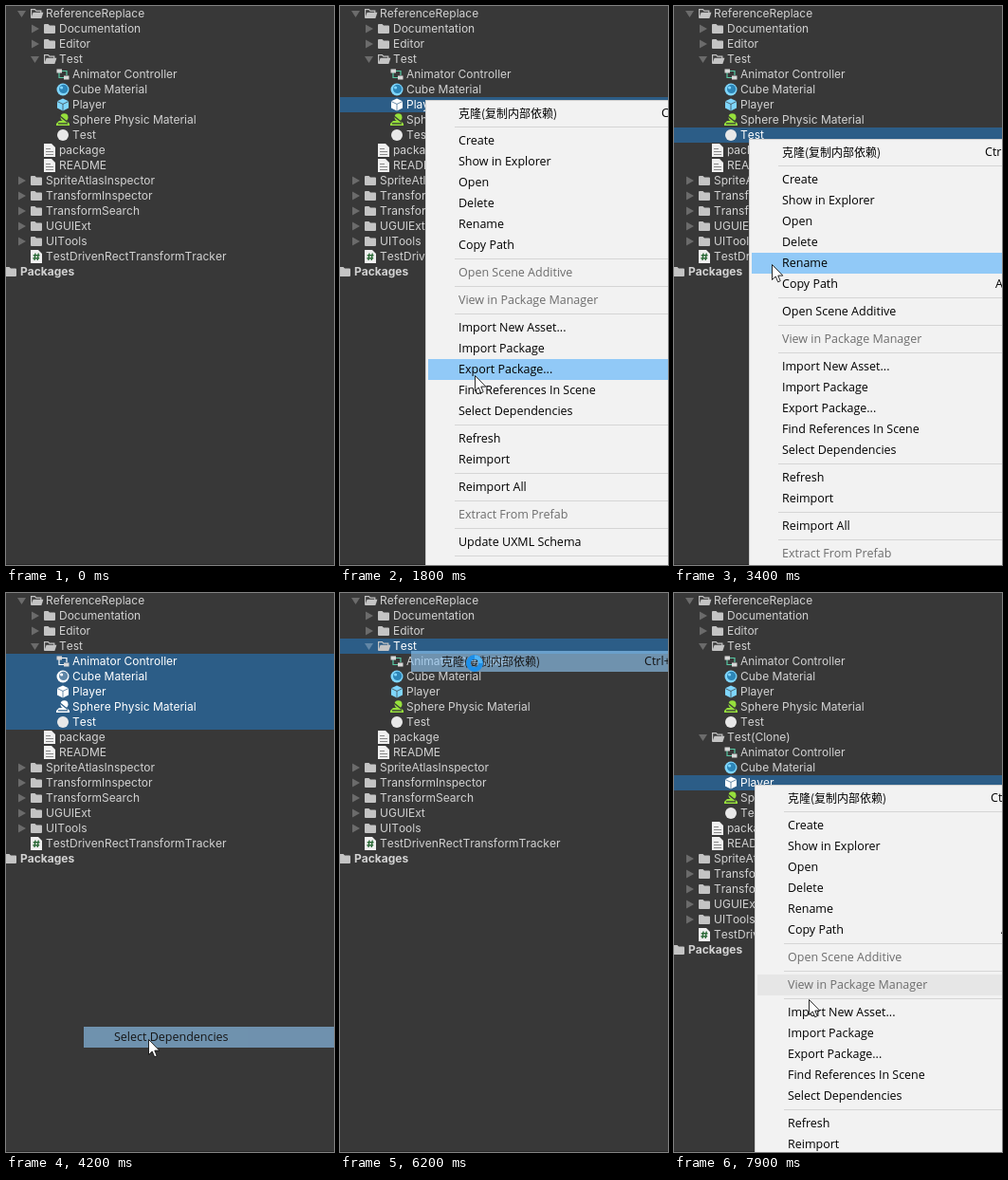
An HTML page for the animation above (8 s loop, 346 by 589 pixels).

```html
<!DOCTYPE html>
<html lang="en">
<head>
<meta charset="utf-8">
<title>Project tree</title>
<style>
  html, body { margin: 0; width: 100%; height: 100%; overflow: hidden; background: #383838; }
  #stage { position: relative; width: 346px; height: 589px; overflow: hidden; background: #383838; cursor: default; }
  #stage::after { content: ""; position: absolute; left: 0; top: 588px; width: 346px; height: 1px; background: #292929; }
  .row { --back: #383838; --blue: #7fd6fd; --green: #96e03c; --teal: #58c9a4; --disc: #2d86b8;
    position: relative; height: 16px; font: 12px/16px Inter, sans-serif; font-kerning: none; color: #d2d2d2; white-space: pre; }
  .row svg { position: absolute; top: 0; width: 16px; height: 16px; overflow: visible; }
  .row span { position: absolute; top: 0; }
  .row.bold { font-weight: 700; }
  .row.selected { --back: #2c5d87; --blue: #fff; --green: #fff; --teal: #fff; --disc: #5f87a8; background: var(--back); color: #fff; }
  #menu { position: absolute; z-index: 1; box-sizing: border-box; width: 360px; height: 620px; padding-top: 3px;
    font: 12.5px/22px "Open Sans", sans-serif; color: #000; white-space: pre; }
  #menu.full { background: #f2f2f2; box-shadow: inset 1px 1px #cfcfcf; }
  .item { position: relative; height: 22px; margin-left: 3px; }
  .item span { position: absolute; left: 32px; top: 0; }
  .item .cjk { font: 12px/22px "Noto Sans CJK SC", "Noto Sans CJK", sans-serif; }
  .item.off { color: #6d6d6d; }
  .item.hot { background: #91c9f7; }
  .item.hot.off { background: #e6e6e6; }
  .line { height: 7px; position: relative; }
  .line::after { content: ""; position: absolute; left: 31px; right: 0; top: 3px; height: 1px; background: #d5d5d5; }
  #menu:not(.full) > :not(.hot) { visibility: hidden; }
  #pointer, #busy { position: absolute; z-index: 2; left: 0; top: 0; overflow: visible; }
</style>
</head>
<body>
<div id="stage">
  <div id="tree"></div>
  <div id="menu"></div>
  <svg id="pointer" width="12" height="20">
    <path d="M.5.5V16.5L4.2 13 6.7 18.8 9.2 17.7 6.8 12.1H11.8Z" fill="#fff" stroke="#111" stroke-width=".9"/>
  </svg>
  <svg id="busy" width="18" height="18">
    <circle cx="9" cy="9" r="6.5" fill="none" stroke="#1d8fe8" stroke-width="5"/>
    <path d="M9 2.5A6.5 6.5 0 0 1 15.5 9" fill="none" stroke="#52b4f5" stroke-width="4"/>
  </svg>
</div>
<script>
const LOOP = 8000, STEP = 100;
const $ = id => document.getElementById(id);

const page = '<path d="M2 1H10L14 5V15H2Z" fill="#f0f0f0"/>';
const icons = {
  folder: '<path d="M2 4Q2 3 3 3H6.5L8 4.5H13Q14 4.5 14 5.5V12Q14 13 13 13H3Q2 13 2 12Z" fill="#c4c4c4"/>',
  open: '<path d="M2.6 12.4V3.6H6.4L8 5.2H12.8V7" fill="none" stroke="#c4c4c4" stroke-width="1.2"/><path d="M4.6 6.8H15.4L13.4 13H2.3Z" fill="#c4c4c4"/>',
  animator: '<path d="M4 6V11.5H9M7 4.5H12V9" fill="none" stroke="var(--teal)" stroke-width="1.2"/><path d="M1.5 2.5H7V6.5H1.5ZM9 9.5H14.5V13.5H9Z" fill="#d8d8d8"/>',
  material: '<circle cx="8" cy="8" r="6.5" fill="var(--blue)"/><circle cx="8.6" cy="7.4" r="4.6" fill="var(--disc)"/><circle cx="6.6" cy="6" r="1.6" fill="var(--blue)"/>',
  cube: '<path d="M8 1.5 14 4.3V11.5L8 14.5 2 11.5V4.3Z" fill="var(--blue)"/><path d="M2 4.5 8 7.4 14 4.5M8 7.4V14.5" fill="none" stroke="var(--back)" stroke-opacity=".7"/>',
  physic: '<path d="M1 14V12L4 9H12L15 12V14Z" fill="var(--green)"/><circle cx="9.5" cy="5.2" r="4" fill="var(--green)"/><path d="M2.5 2 13 10.5M3 11.8H13" stroke="var(--back)" stroke-width="1.2"/>',
  scene: '<circle cx="8" cy="8" r="6" fill="#e8e8e8"/>',
  doc: page + '<path d="M4 6.5H9M4 9.5H12M4 12.5H12" stroke="#888"/>',
  script: page + '<path d="M7 4.5 6 12M10.2 4.5 9.2 12M4.7 6.8H11.5M4.4 9.7H11.2" stroke="#2c6a38" stroke-width="1.4"/>'
};
const arrows = { down: 'M4 5H13L8.5 12Z', right: 'M5 3.5V12.5L13 8Z' };

// [label, icon, icon x, arrow]
const assets = [
  ['Animator Controller', 'animator', 52], ['Cube Material', 'material', 52], ['Player', 'cube', 52],
  ['Sphere Physic Material', 'physic', 52], ['Test', 'scene', 52]
];
const clone = [['Test(Clone)', 'open', 38, 'down'], ...assets];
const nodes = [
  ['ReferenceReplace', 'open', 24, 'down'],
  ['Documentation', 'folder', 38, 'right'], ['Editor', 'folder', 38, 'right'],
  ['Test', 'open', 38, 'down'], ...assets, ...clone,
  ['package', 'doc', 38], ['README', 'doc', 38],
  ...['SpriteAtlasInspector', 'TransformInspector', 'TransformSearch', 'UGUIExt', 'UITools']
    .map(name => [name, 'folder', 24, 'right']),
  ['TestDrivenRectTransformTracker', 'script', 24], ['Packages', 'folder', -3]
];
$('tree').innerHTML = nodes.map(([label, icon, x, arrow]) =>
  `<div class="row${label === 'Packages' ? ' bold' : ''}">` +
  (arrow ? `<svg style="left:${x - 16}px"><path d="${arrows[arrow]}" fill="#fff" fill-opacity=".26"/></svg>` : '') +
  `<svg style="left:${x}px">${icons[icon]}</svg><span style="left:${x + 18}px">${label}</span></div>`
).join('');
const rows = [...$('tree').children];
const cloneStart = 9, cloneEnd = cloneStart + clone.length;

const entries = ['克隆(复制内部依赖)', '-', 'Create', 'Show in Explorer', 'Open', 'Delete', 'Rename', 'Copy Path', '-',
  'Open Scene Additive', '-', 'View in Package Manager', '-', 'Import New Asset...', 'Import Package',
  'Export Package...', 'Find References In Scene', 'Select Dependencies', '-', 'Refresh', 'Reimport', '-',
  'Reimport All', '-', 'Extract From Prefab', '-', 'Update UXML Schema', '-', 'Open C# Project'];
const disabled = ['Open Scene Additive', 'View in Package Manager', 'Extract From Prefab'];
const shortcuts = { [entries[0]]: ['Ctrl+Shift+D', 246], 'Copy Path': ['Alt+Ctrl+C', 257] };
let offset = 3;
const items = [];
for (const label of entries) {
  const el = document.createElement('div');
  if (label === '-') {
    el.className = 'line';
    offset += 7;
  } else {
    const [keys, x] = shortcuts[label] || ['', 0];
    el.className = 'item' + (disabled.includes(label) ? ' off' : '');
    el.innerHTML = `<span${label === entries[0] ? ' class="cjk"' : ''}>${label}</span><span style="left:${x}px">${keys}</span>`;
    items.push({ el, label, top: offset });
    offset += 22;
  }
  $('menu').append(el);
}
const additive = items.find(item => item.label === 'Open Scene Additive');

// [start, first row, last row]
const selections = [[0, -1, -1], [1100, 6, 6], [2200, 4, 7], [3100, 8, 8], [4200, 4, 8], [5200, 3, 3], [7500, 12, 12]];
// open: half faded in, then solid; close: only the chosen item lingers for one step
const menus = [
  { open: 1200, close: 2200, x: 90, y: 99 },
  { open: 3300, close: 4200, x: 79, y: 140, scene: true },
  { open: 5400, close: 6200, x: 72, y: 58 },
  { open: 7600, close: LOOP, x: 85, y: 202 }
];
// [time, x, y]
const path = [
  [200, 287, 51], [500, 170, 82], [900, 90, 99], [1200, 90, 99], [1500, 112, 270], [1900, 152, 428],
  [2200, 152, 428], [2600, 69, 198], [3000, 79, 140], [3300, 79, 140], [3400, 103, 272], [3800, 138, 432],
  [4100, 150, 470], [4200, 150, 470], [4600, 88, 190], [5000, 72, 62], [5100, 72, 58], [5400, 72, 58],
  [5900, 142, 75], [6600, 142, 75], [7000, 74, 190], [7200, 72, 214], [7400, 85, 202], [7600, 85, 202],
  [7700, 93, 242], [7800, 120, 345], [7900, 142, 428], [LOOP, 142, 428]
];

function pointerAt(t) {
  const i = Math.max(1, path.findIndex(p => p[0] > t));
  const [t0, x0, y0] = path[i - 1], [t1, x1, y1] = path[i];
  const k = Math.max(0, (t - t0) / (t1 - t0));
  return [Math.round(x0 + (x1 - x0) * k), Math.round(y0 + (y1 - y0) * k)];
}

function drawMenu(t, y) {
  const menu = menus.find(m => t >= m.open && t <= m.close);
  $('menu').style.display = menu ? 'block' : 'none';
  if (!menu) return;
  const closing = t >= menu.close;
  $('menu').className = closing ? '' : 'full';
  $('menu').style.left = menu.x + 'px';
  $('menu').style.top = menu.y + 'px';
  $('menu').style.opacity = closing ? .62 : t < menu.open + STEP ? .52 : 1;
  additive.el.classList.toggle('off', !menu.scene);
  const hot = items.filter(item => item.top <= y - menu.y).pop();
  for (const item of items) item.el.classList.toggle('hot', item === hot);
}

function draw(t) {
  const [, first, last] = selections.filter(s => s[0] <= t).pop();
  rows.forEach((row, i) => {
    row.classList.toggle('selected', i >= first && i <= last);
    row.style.display = t < 6400 && i >= cloneStart && i < cloneEnd ? 'none' : '';
  });
  const [x, y] = pointerAt(t);
  const busy = t >= 6200 && t < 6400;
  $('pointer').style.display = t < 200 || busy ? 'none' : '';
  $('pointer').style.transform = `translate(${x}px,${y}px)`;
  $('busy').style.display = busy ? '' : 'none';
  $('busy').style.transform = `translate(${x - 9}px,${y - 10}px) rotate(${(t - 6200) * .9}deg)`;
  drawMenu(t, y);
}

const start = performance.now();
function tick() {
  const t = (performance.now() - start) % LOOP;
  draw(Math.floor(t / STEP) * STEP);
  requestAnimationFrame(tick);
}
tick();
</script>
</body>
</html>
```
